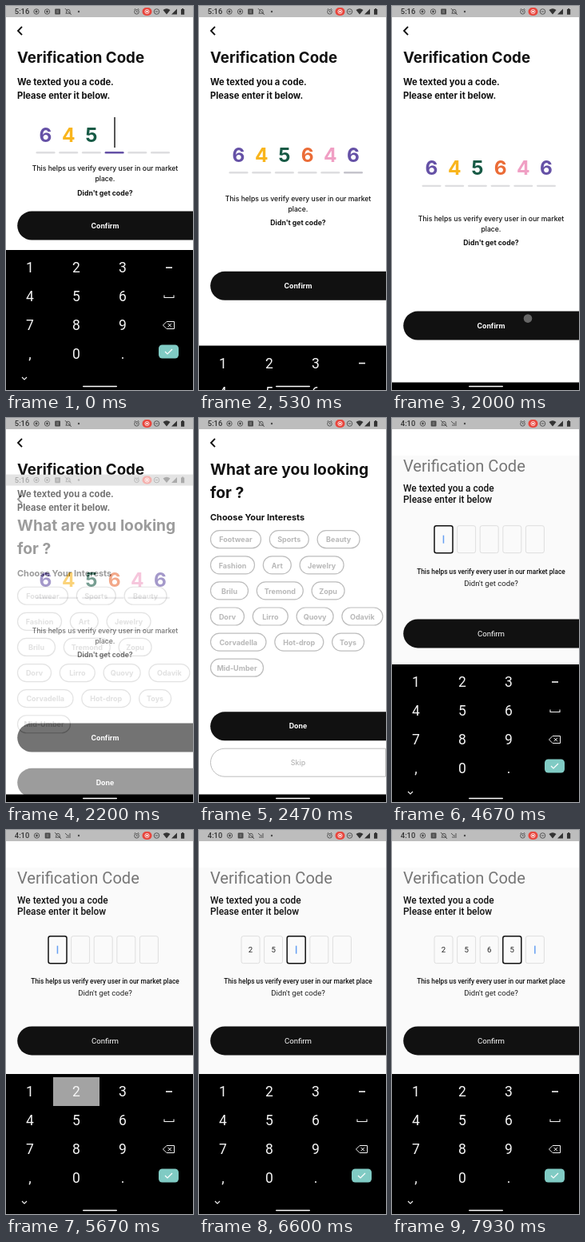
These frames come from a looping animation (234 by 480 pixels, 8000 ms). An HTML page:

```html
<!DOCTYPE html>
<html lang="en">
<head>
<meta charset="utf-8">
<title>Verification code</title>
<style>
html, body { margin: 0; width: 100%; height: 100%; overflow: hidden; background: #fff; }
svg { display: block; width: 234px; height: 480px; }
.new { font-family: Inter, sans-serif; }
.old { font-family: Roboto, sans-serif; }
</style>
</head>
<body>
<svg id="stage" viewBox="0 0 234 480"></svg>
<script>
const LOOP = 8000, STEP = 1000 / 15;
const INK = '#111', GREY = '#bdbdbd';
const stage = document.getElementById('stage');

const easeOut = (t, start, dur) => {
  const p = Math.min(1, Math.max(0, (t - start) / dur));
  return 1 - (1 - p) ** 2;
};
const count = (times, t) => times.filter(x => t >= x).length;
const within = (t, a, b) => t >= a && t < b;

const text = (s, x, y, size, weight = 400, fill = INK, anchor = 'start') =>
  `<text x="${x}" y="${y}" font-size="${size}" font-weight="${weight}" fill="${fill}" text-anchor="${anchor}">${s}</text>`;
const mid = (s, x, y, size, weight, fill) => text(s, x, y, size, weight, fill, 'middle');
const rect = (x, y, w, h, fill, r = 0, more = '') =>
  `<rect x="${x}" y="${y}" width="${w}" height="${h}" rx="${r}" fill="${fill}" ${more}/>`;
const line = (d, stroke, w = 1) =>
  `<path d="${d}" fill="none" stroke="${stroke}" stroke-width="${w}"/>`;
const circle = (x, y, r, fill, more = '') =>
  `<circle cx="${x}" cy="${y}" r="${r}" fill="${fill}" ${more}/>`;
const group = (s, attrs) => `<g ${attrs}>${s}</g>`;
const shift = (s, dy) => group(s, `transform="translate(0 ${dy.toFixed(2)})"`);

// Wide button that runs off the right edge; y is its centre
const button = (label, y, size, weight) =>
  rect(14.2, y - 18, 260, 36, INK, 18) + mid(label, 124, y + size * .36, size, weight, '#fff');

const outlineButton = (label, y) =>
  `<path d="M233.5 ${y - 17.5}H32a17.5 17.5 0 0 0 0 35H233.5z" fill="#fff" stroke="${GREY}"/>` +
  mid(label, 124, y + 3.2, 8.9, 500, '#b5b5b5');

function statusBar(time, recording) {
  const c = '#4a4a4a';
  const ring = x => circle(x, 7, 3.2, 'none', `stroke="${c}" stroke-width=".9"`) + circle(x, 7, 1.4, c);
  const square = x => rect(x - 3.3, 3.6, 6.8, 7, c, .8) + line(`M${x - 1.5} 6h3M${x - 1.5} 8h3`, GREY, .6);
  const bell = x => line(`M${x - 3.3} 9.2h6.6M${x - 2.2} 9V6.5a2.2 2.2 0 0 1 4.4 0V9M${x - 4} 3l8 8`, c, .9);
  const bars = x => line(`M${x - 2} 10V8M${x} 10V6M${x + 2} 10V4M${x - 4} 4l3 3`, c, .9);
  const left = recording ? ring(38) + ring(51.5) + square(64.5) + bell(77.8)
                         : ring(38.5) + square(52) + bell(65) + bars(78);
  return rect(0, 0, 234, 14, GREY) + text(time, 10.8, 10.2, 9.4, 500, '#333', 'start" font-family="Roboto, sans-serif') +
    left + circle(91, 7, 1.2, c) +
    circle(163.5, 7.3, 2.8, 'none', `stroke="${c}" stroke-width=".9"`) +
    line('M163.5 5.7v1.8h1.2M160.5 4.5l1.5-1.3M166.5 4.5l-1.5-1.3', c, .8) +
    rect(170.5, 2, 12, 10, '#e8453c', 5) + circle(176.5, 7, 2.6, 'none', 'stroke="#fff" stroke-width=".8"') +
    circle(176.5, 7, 1.2, '#fff') +
    circle(188.5, 7, 3.3, 'none', `stroke="${c}" stroke-width=".9"`) + line('M186.8 7h3.4', c, .9) +
    '<path d="M196.5 5q4.500-3.500 9 0l-4.500 5.500zM214 3.500v7h-7zM219 4h1.200v-1h1.800v1h1.200v6.800h-4.200z" fill="#333"/>';
}

const back = line('M20 25.800l-5 5.200 5 5.200', INK, 1.9);

const CODE = [['6', '#6551a6'], ['4', '#f9b51c'], ['5', '#175a45'], ['6', '#eb6c37'], ['4', '#f09fc4'], ['6', '#6551a6']];

function codeScreen(t) {
  const drop = 125 * easeOut(t, 360, 470);
  const n = 3 + count([60, 190, 320], t);
  const slots = CODE.map(([d, color], i) => {
    const x = 49.5 + i * 28.7;
    const active = i === Math.min(n, 5) && t < 800;
    const bar = !active ? '#dedee0' : n < 6 ? '#6551a6' : '#c5c4cc';
    return rect(x - 12, 182, 24, 2.4, bar, 1.2) + (i < n ? mid(d, x, 169.7, 24.5, 700, color) : '');
  }).join('');
  const caret = n < 6 ? rect(135.3 + (n - 3) * 28.7, 139, 1.4, 38, INK) : '';
  return rect(0, 0, 234, 480, '#fff') + back +
    text('Verification Code', 14, 70.5, 18.7, 700) +
    text('We texted you a code.', 14, 99.3, 11.2, 650) +
    text('Please enter it below.', 14, 116, 11.2, 650) +
    shift(slots + caret, drop / 3) +
    shift(mid('This helps us verify every user in our market', 124, 206, 8.6, 450) +
      mid('place.', 124, 219, 8.6, 450) +
      mid("Didn't get code?", 124, 236.9, 8.7, 700), drop / 2) +
    shift(button('Confirm', 274.6, 8.8, 700), drop) +
    (within(t, 1930, 2130) ? circle(170, 390.6, 5.3, '#666') : '') +
    statusBar('5:16', true);
}

const CHIPS = [
  [['Footwear', 64], ['Sports', 50], ['Beauty', 54]],
  [['Fashion', 56], ['Art', 36], ['Jewelry', 56]],
  [['Brilu', 48], ['Tremond', 59], ['Zopu', 42]],
  [['Dorv', 43], ['Lirro', 45], ['Quovy', 47], ['Odavik', 52]],
  [['Corvadella', 70.5], ['Hot-drop', 62], ['Toys', 41]],
  [['Mid-Umber', 67]]
];

function interestsScreen() {
  let chips = '';
  CHIPS.forEach((row, r) => {
    let x = 14.5;
    const y = 151.7 + r * 32.1;
    for (const [label, w] of row) {
      chips += rect(x, y - 11, w - 1, 22, '#fff', 11, `stroke="${GREY}" stroke-width="1.2"`) +
        mid(label, x + w / 2 - .5, y + 3.7, 9, 650, '#b8b8b8');
      x += w + 9.8;
    }
  });
  return rect(0, 0, 234, 480, '#fff') + back +
    text('What are you looking', 14, 70.7, 19.25, 700) + text('for ?', 14, 99.5, 19.25, 700) +
    text('Choose Your Interests', 14, 127.6, 10.95, 650) + chips +
    button('Done', 385.3, 8.8, 700) + outlineButton('Skip', 430.7) +
    statusBar('5:16', true);
}

const PIN = ['2', '5', '6', '5'];

// Box index holding the blinking caret, or -1
function caretBox(t) {
  const spans = [[0, 4190, 4700], [0, 5190, 5790], [1, 5790, 6260], [2, 6260, 6730], [3, 7190, 7790], [4, 7920, LOOP]];
  const hit = spans.find(([, a, b]) => within(t, a, b));
  return hit ? hit[0] : -1;
}

function pinScreen(t) {
  const rise = -124 * easeOut(t, 4300, 470);
  const typed = count([5790, 6260, 7190, 7920], t);
  const focus = count([4260, 5860, 6330, 7260], t) - 1;
  const caret = caretBox(t);
  let boxes = '';
  for (let i = 0; i < 5; i++) {
    const x = 64.5 + i * 28.6, on = i === focus;
    boxes += rect(x - 11.5, 174, 23, 34, '#fafafa', 2.5, `stroke="${on ? INK : '#dedede'}" stroke-width="${on ? 1.5 : 1}"`);
    if (i < typed) boxes += mid(PIN[i], x, 194.5, 9.6, 400, '#222');
    if (i === caret) boxes += rect(x - .8, 186, 1.5, 10, t < 4260 ? '#45b3c2' : '#659ff2');
  }
  return rect(0, 0, 234, 480, '#fafafa') + rect(0, 0, 234, 47, '#fff') +
    text('Verification Code', 14, 67, 20.1, 400, '#777') +
    text('We texted you a code', 14, 92, 11.9, 500) + text('Please enter it below', 14, 106, 11.9, 500) +
    shift(boxes, rise / 3) +
    shift(mid('This helps us verify every user in our market place', 124, 254, 8.3, 500) +
      mid("Didn't get code?", 124, 269.3, 9.6, 400, '#222'), rise / 2) +
    shift(button('Confirm', 387.4, 9.6, 400), rise) +
    statusBar('4:10', false);
}

const KEYS = ['123–', '456', '789', ',0.'];

function pressedKey(t) {
  const taps = [['2', 5660, 5790], ['5', 6130, 6260], ['6', 7060, 7190], ['5', 7790, 7920]];
  const tap = taps.find(([, a, b]) => within(t, a, b));
  return tap && tap[0];
}

function keyboard(t) {
  const down = t < 2000 ? easeOut(t, 310, 470) : 1 - easeOut(t, 4260, 470);
  if (down === 1) return '';
  const held = pressedKey(t), white = '#f4f4f4';
  let s = rect(0, 305, 234, 175, '#000');
  KEYS.forEach((row, r) => [...row].forEach((k, c) => {
    const x = 30 + c * 58, y = 309 + r * 36;
    if (k === held) s += rect(x - 29, y, 58, 36, '#a3a3a3');
    s += k === '–' ? rect(x - 4, y + 17.2, 8, 1.6, white) : mid(k, x, y + 24, 17.5, 400, white);
  }));
  s += line('M198 361.5v3h12v-3', white, 1.1) +
    line('M201 394.5h9.5v9h-9.5l-4.500-4.500zM202.5 396.800l4.500 4.500M207 396.800l-4.500 4.500', white, 1) +
    rect(191, 423.5, 25, 17, '#80cbc4', 4.5) + line('M199 432l3 3 6-6', '#fff', 1.2) +
    line('M20 464l3 3 3-3', white, 1.1);
  return shift(s, 165 * down);
}

function scene(t) {
  let s = '';
  if (t < 2430) s += group(codeScreen(t), 'class="new"');
  if (within(t, 2130, 2990)) {
    const p = easeOut(t, 2130, 300);
    s += group(shift(interestsScreen(), 120 * (1 - p)), `class="new" opacity="${p.toFixed(3)}"`);
  }
  if (t > 2850) s += group(pinScreen(t), `class="old" opacity="${Math.min(1, (t - 2800) / 200).toFixed(3)}"`);
  return s + rect(0, 470.5, 234, 9.5, '#000') + group(keyboard(t), 'class="old"') +
    rect(96, 474.8, 43, 1.5, '#fff', .7);
}

let last = -1;
function draw(now) {
  // The screen updates 15 times a second
  const step = Math.floor((now % LOOP + 4) / STEP) % 120;
  if (step !== last) stage.innerHTML = scene((last = step) * STEP);
  requestAnimationFrame(draw);
}
draw(performance.now());
</script>
</body>
</html>
```
